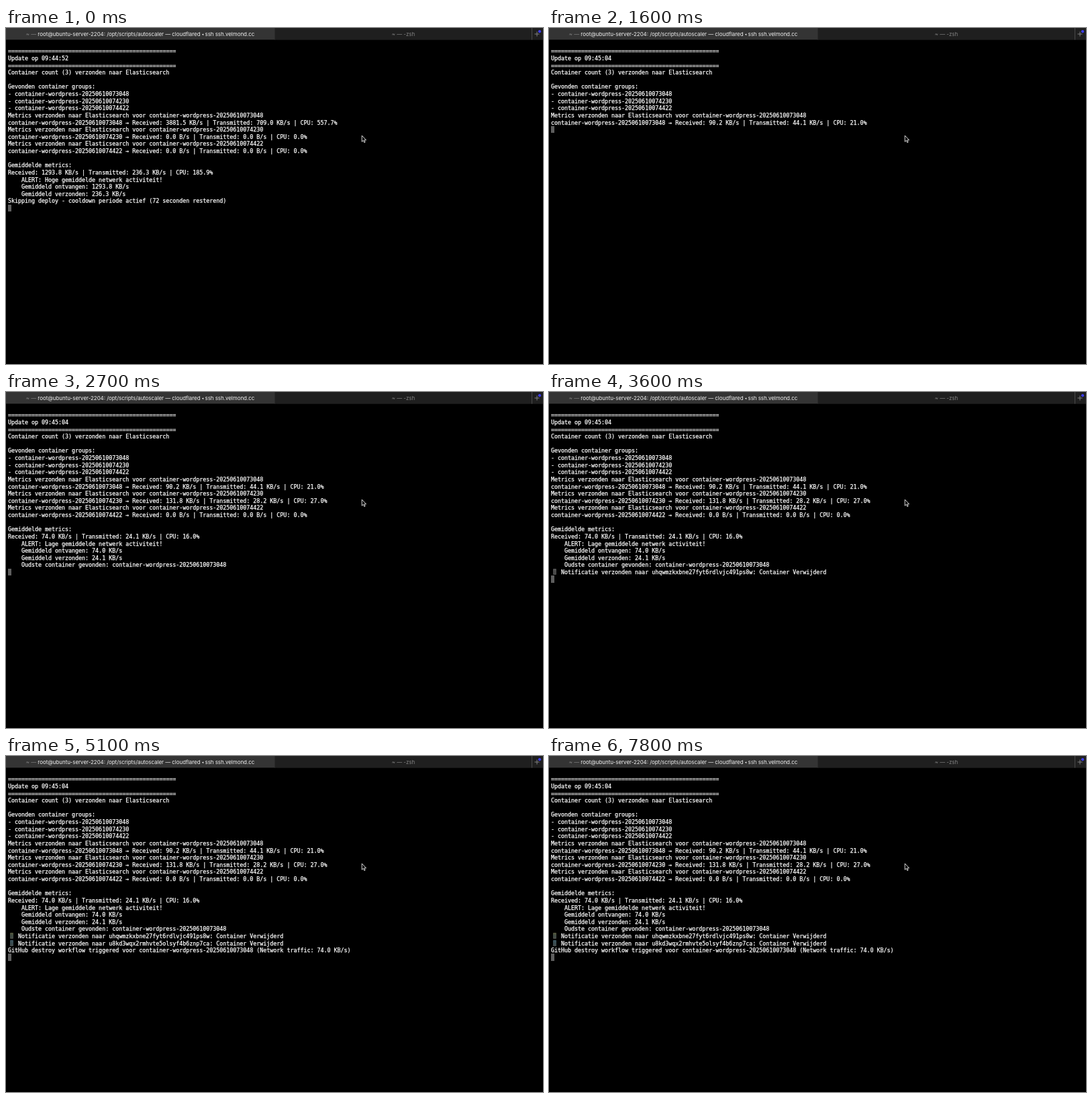
An HTML page that plays this animation: 800 px wide and 500 px high, repeating every 8 s.

```html
<!DOCTYPE html>
<html lang="nl">
<head>
<meta charset="utf-8">
<title>Autoscaler</title>
<style>
html, body { margin: 0; width: 100%; height: 100%; overflow: hidden; background: #000; }
#stage { position: relative; width: 800px; height: 500px; overflow: hidden; background: #000; }
.tab {
  position: absolute; top: 0; height: 18px; box-sizing: border-box;
  border-bottom: 1px solid #161616;
  font: 7.9px/18px Inter, "Liberation Sans", sans-serif;
  text-align: center; white-space: pre; color: #858585; background: #1f1f1f;
}
.tab.active { left: 0; width: 400px; background: #343434; }
.tab.active b { font-weight: 400; color: #f4f4f4; }
.tab.active small { font-size: 5px; vertical-align: 1px; line-height: 1; }
.tab.idle { left: 400px; width: 383px; border-left: 1px solid #292929; }
.tab.add { left: 783px; width: 17px; border-left: 1px solid #4a4a4a; }
.line, #cursor { position: absolute; left: 3px; height: 10.625px; }
.line {
  font: 8.32px/10.625px "DejaVu Sans Mono", "Liberation Mono", monospace;
  white-space: pre; color: #fff; font-variant-ligatures: none;
  -webkit-text-stroke: .25px #fff;
}
#cursor { width: 5px; background: #5e5e5e; }
.phone {
  position: absolute; left: 3px; top: 0; width: 5px; height: 9px; border-radius: 1px;
  background: linear-gradient(#55573a, #3d4a44 55%, #4c4c46);
}
.phone.cool { background: linear-gradient(#3b5560, #3a4c50 55%, #464c4c); }
.grey .phone { filter: grayscale(1); }
svg { position: absolute; left: 0; top: 0; }
</style>
</head>
<body>
<div id="stage">
  <div class="tab active">~ — <b>root@ubuntu-server-2204: /opt/scripts/autoscaler — cloudflared <small>◂</small> ssh ssh.velmond.cc</b></div>
  <div class="tab idle">~ — -zsh</div>
  <div class="tab add"></div>
  <div id="screen"></div>
  <div id="cursor"></div>
  <svg width="800" height="500">
    <path d="M787.5 9h7M791 5.5v7" stroke="#8c8c8c" stroke-width=".9"/>
    <circle cx="795" cy="5.2" r="2.1" fill="#3d3df0"/>
    <path d="M530.2 160v9.2l2.1-1.9 1.4 3.2 1.4-.6-1.4-3.1h2.8z" fill="#000" stroke="#eee" stroke-width=".9" stroke-linejoin="round"/>
  </svg>
</div>
<script>
const LOOP = 8000, TOP = 28.75, ROW = 10.625;
const TEXT_DROP = .5; // text sits slightly lower than the cursor cell
const IDS = ["073048", "074230", "074422"].map(n => "container-wordpress-20250610" + n);
const RULE = "=".repeat(50);

const header = time => [RULE, "Update op " + time, RULE];
const groups = ["Container count (3) verzonden naar Elasticsearch", "",
  "Gevonden container groups:", ...IDS.map(id => "- " + id)];
const stats = (rx, tx, cpu) => `Received: ${rx} | Transmitted: ${tx} | CPU: ${cpu}%`;
const metrics = (i, ...v) => ["Metrics verzonden naar Elasticsearch voor " + IDS[i],
  IDS[i] + " → " + stats(...v)];
const idle = i => metrics(i, "0.0 B/s", "0.0 B/s", "0.0");
const average = (rx, tx, cpu, level) => ["", "Gemiddelde metrics:", stats(rx, tx, cpu),
  `    ALERT: ${level} gemiddelde netwerk activiteit!`,
  "    Gemiddeld ontvangen: " + rx, "    Gemiddeld verzonden: " + tx];
const notice = key => [`   Notificatie verzonden naar ${key}: Container Verwijderd`];

// Each block appears at its time; a clearing block starts a fresh screen.
const blocks = [
  { at: 0, clear: true, lines: [...header("09:44:52"), ...groups,
    ...metrics(0, "3881.5 KB/s", "709.0 KB/s", "557.7"), ...idle(1), ...idle(2),
    ...average("1293.8 KB/s", "236.3 KB/s", "185.9", "Hoge"),
    "Skipping deploy - cooldown periode actief (72 seconden resterend)"] },
  { at: 800, clear: true, lines: header("09:45:04") },
  { at: 1200, lines: groups },
  { at: 1600, lines: metrics(0, "90.2 KB/s", "44.1 KB/s", "21.0") },
  { at: 2100, lines: metrics(1, "131.8 KB/s", "28.2 KB/s", "27.0") },
  { at: 2700, lines: [...idle(2), ...average("74.0 KB/s", "24.1 KB/s", "16.0", "Lage"),
    "    Oudste container gevonden: " + IDS[0]] },
  { at: 3600, phone: "phone", lines: notice("uhqwmzkxbne27fyt6rdlvjc491ps8w") },
  { at: 4000, phone: "phone cool", lines: notice("u8kd3wqx2rmhvte5olsyf4b6znp7ca") },
  { at: 4700, lines: [`GitHub destroy workflow triggered voor ${IDS[0]} (Network traffic: 74.0 KB/s)`] }
];

const screen = document.getElementById("screen");
const cursor = document.getElementById("cursor");
const rowTop = (row, drop = 0) => TOP + row * ROW + drop + "px";

let row = 0;
for (const block of blocks) {
  if (block.clear) row = 0;
  block.node = screen.appendChild(document.createElement("div"));
  for (const text of block.lines) {
    const line = block.node.appendChild(document.createElement("div"));
    line.className = "line";
    line.textContent = text;
    line.style.top = rowTop(row++, TEXT_DROP);
    if (block.phone) line.appendChild(document.createElement("i")).className = block.phone;
  }
  block.end = row;
}

function draw() {
  const t = performance.now() % LOOP;
  const last = blocks.findLastIndex(b => b.at <= t);
  const first = blocks.findLastIndex((b, i) => b.clear && i <= last);
  blocks.forEach((b, i) => b.node.hidden = i < first || i > last);
  cursor.style.top = rowTop(blocks[last].end);
  screen.className = t < 4700 ? "grey" : "";
  requestAnimationFrame(draw);
}
draw();
</script>
</body>
</html>
```
